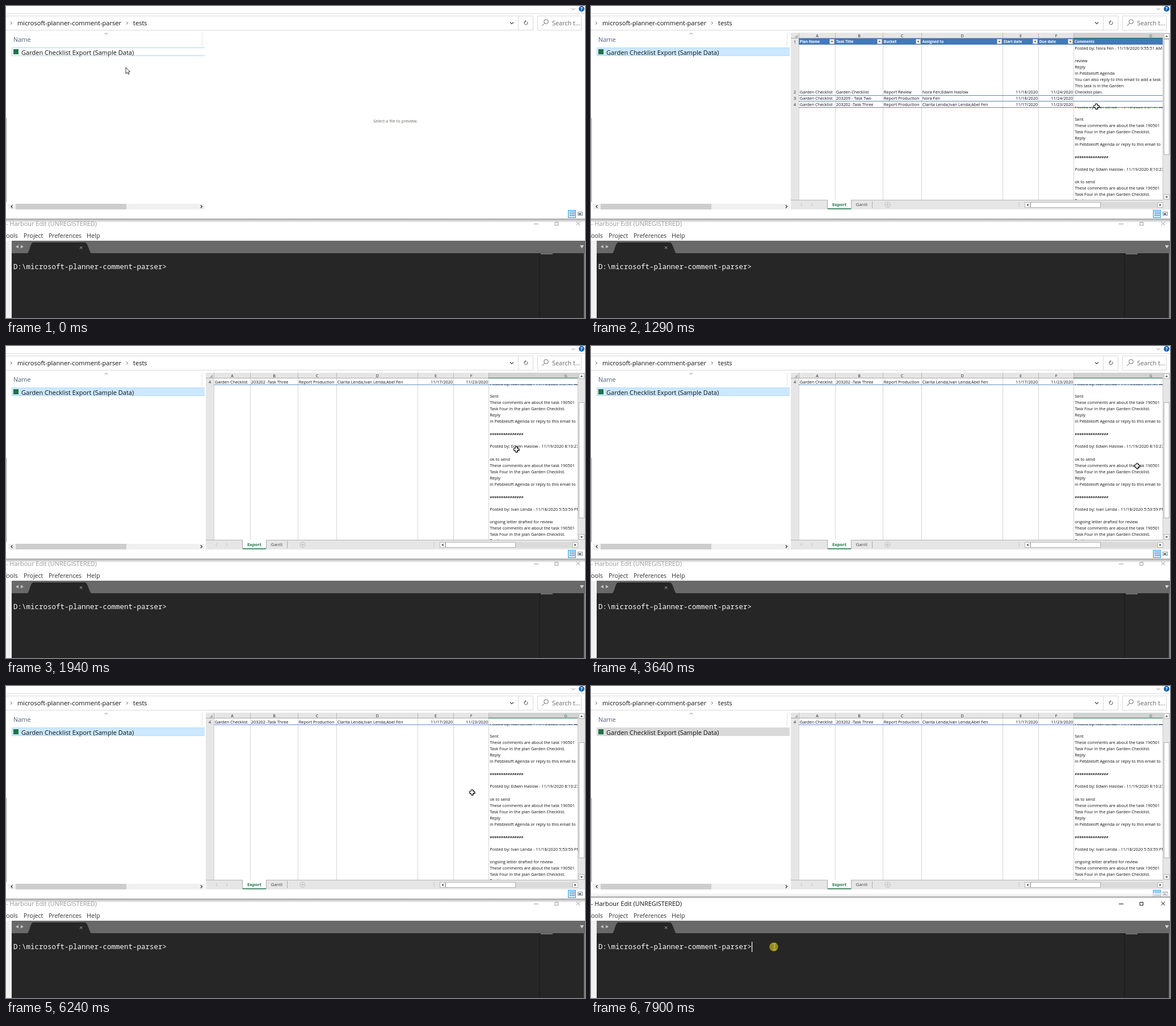
An HTML page that plays this animation: 1020x549 px, repeating every 8 s.

```html
<!DOCTYPE html>
<html lang="en">
<head>
<meta charset="utf-8">
<title>Spreadsheet preview</title>
<style>
html, body { margin: 0; width: 100%; height: 100%; overflow: hidden; background: #fff; }
svg { display: block; width: 1020px; height: 549px; font-family: "Open Sans", "Noto Sans", sans-serif; }
text { white-space: pre; }
.mono { font-family: "Noto Sans Mono", "DejaVu Sans Mono", monospace; }
</style>
</head>
<body>
<svg id="stage" viewBox="0 0 1020 549"></svg>
<script>
const NS = 'http://www.w3.org/2000/svg';
const LOOP = 8000;
const CELL = 7.35, PITCH = 11.03;
const GREEN = '#217346';
const stage = document.getElementById('stage');

function add(parent, tag, attrs = {}, content) {
  const el = document.createElementNS(NS, tag);
  for (const key in attrs) el.setAttribute(key, attrs[key]);
  if (content !== undefined) el.textContent = content;
  parent.appendChild(el);
  return el;
}
const group = (parent, attrs) => add(parent, 'g', attrs);
const rect = (p, x, y, width, height, fill, more = {}) =>
  add(p, 'rect', { x, y, width, height, fill, ...more });
const frame = (p, x, y, w, h, stroke, fill = 'none') =>
  rect(p, x + .5, y + .5, w - 1, h - 1, fill, { stroke });
const shape = (p, d, fill, more = {}) => add(p, 'path', { d, fill, ...more });
const line = (p, d, stroke, width = 1) => shape(p, d, 'none', { stroke, 'stroke-width': width });
const text = (p, x, y, str, size, fill = '#111', more = {}) =>
  add(p, 'text', { x, y, 'font-size': size, fill, ...more }, str);
const show = (el, on) => el.setAttribute('visibility', on ? 'visible' : 'hidden');

const defs = add(stage, 'defs');
function clip(id, x, y, w, h) {
  rect(add(defs, 'clipPath', { id }), x, y, w, h);
}
function fade(id, from, to) {
  const g = add(defs, 'linearGradient', { id, x1: 0, y1: 0, x2: 0, y2: 1 });
  add(g, 'stop', { offset: 0, 'stop-color': from });
  add(g, 'stop', { offset: 1, 'stop-color': to });
}
clip('gridArea', 352, 57, 655, 284);
clip('topNote', 851, 68, 156, 110);
clip('lowNote', 851, 177.5, 156, 400);
fade('shadeDown', '#a3a3a3', '#fdfdfd');
fade('shadeUp', '#ffffff', '#d4d4d4');

// File browser
rect(stage, 0, 0, 1020, 549, '#fff');
line(stage, 'M0 13.5H1020', '#dcdcdc');
line(stage, 'M996.5 4l3 3 3-3', '#888');
add(stage, 'circle', { cx: 1014, cy: 5, r: 5, fill: '#0a63b5' });
text(stage, 1014, 8.3, '?', 9, '#fff', { 'text-anchor': 'middle', 'font-weight': 700 });
line(stage, 'M0 17.5H928.5V42.5H0M902.5 17V42', '#d9d9d9');
frame(stage, 936, 17, 78, 26, '#d9d9d9');
line(stage, 'M8 27.5l2.5 2.5-2.5 2.5M212 27.5l2.5 2.5-2.5 2.5', '#555');
text(stage, 20, 34, 'microsoft-planner-comment-parser', 11.1);
text(stage, 224, 34, 'tests', 11.1);
line(stage, 'M888 28.5l3 3 3-3', '#444', 1.2);
line(stage, 'M918 27.6a3 3 0 1 1-3.4-.5M915.5 25.2v2.6h-2.6', '#444');
add(stage, 'circle', { cx: 951.5, cy: 27.5, r: 3.8, fill: 'none', stroke: '#666' });
line(stage, 'M948.6 30.4L944.5 35', '#666');
text(stage, 962, 34, 'Search t...', 10.9, '#666');
line(stage, 'M174 50l2.5-2.5 2.5 2.5', '#777');
line(stage, 'M345.5 47V70', '#e2e2e2');
text(stage, 13, 63, 'Name', 10.9, '#4c607a');
rect(stage, 0, 197, 1.5, 148, '#bcbcbc');

const hoverRow = group(stage);
line(hoverRow, 'M350 73.5H10.5V87.5H350', '#a5d3f2');
const pickedRow = group(stage);
rect(pickedRow, 10, 73, 340, 15, '#cce8ff');
line(pickedRow, 'M350 73.5H10.5V87.5H350', '#b3dcfb');
const dimRow = rect(stage, 10, 73, 340, 15, '#d9d9d9');
rect(stage, 13, 76, 9, 9, GREEN);
text(stage, 27, 86, 'Garden Checklist Export (Sample Data)', 11.05);

rect(stage, 4, 348, 346, 10, '#f0f0f0');
rect(stage, 17, 348, 195, 10, '#cdcdcd');
line(stage, 'M11.5 350.5l-2.5 2.5 2.5 2.5M343 350.5l2.5 2.5-2.5 2.5', '#333', 1.3);
frame(stage, 990, 359, 14, 14, '#26a0da', '#cce8ff');
for (let y = 363; y < 372; y += 3) line(stage, `M993 ${y - .5}h2M996 ${y - .5}h2.5M999.5 ${y - .5}h2.5`, '#456');
frame(stage, 1007, 362, 9, 7, '#999', '#dfe8ef');
rect(stage, 1009, 365, 4, 2, '#345');

const hint = text(stage, 647, 205.2, 'Select a file to preview.', 7.4, '#6a655e');

// Spreadsheet preview
const sheet = group(stage);
const edges = [366, 430, 514, 582, 725, 788, 850];
const mid = { 'text-anchor': 'middle' };
const end = { 'text-anchor': 'end' };
rect(sheet, 352, 47, 668, 311, '#fff');
rect(sheet, 352, 47, 655, 10, '#e6e6e6');
rect(sheet, 850, 47, 157, 10, '#d2d2d2');
rect(sheet, 352, 57, 14, 284, '#e6e6e6');
shape(sheet, 'M364 50v5.5h-5.5z', '#b0b0b0');
[398.5, 472.5, 548, 654, 757, 819.5].forEach((x, i) => text(sheet, x, 54.8, 'ABCDEF'[i], 7.2, '#222', mid));
text(sheet, 986, 54.8, 'G', 7.2, GREEN, mid);
edges.forEach(x => {
  line(sheet, `M${x + .5} 47V57`, '#b8b8b8');
  line(sheet, `M${x + .5} 57V341`, '#d4d4d4');
});
line(sheet, 'M352 56.5H850', '#ababab');
line(sheet, 'M850 56.5H1007', GREEN);

function dataRow(parent, y, number, cells) {
  text(parent, 359, y + 2.6, number, 7.2, '#222', mid);
  cells.forEach((cell, i) => {
    const isDate = i > 3;
    text(parent, isDate ? edges[i + 1] - .8 : edges[i] + 1.8, y + 2.6, cell, CELL, '#111', isDate ? end : {});
  });
}
function notes(parent, y, lines) {
  lines.forEach((str, i) => {
    if (!str) return;
    const rule = str[0] === '#';
    text(parent, 852.3, y + i * PITCH + 2.6, str, rule ? 6.1 : CELL, '#111', rule ? { 'font-weight': 600 } : {});
  });
}
const plan = 'Garden Checklist', app = 'Pebblesift Agenda';
const rowFour = [plan, '203202 -Task Three', 'Report Production', 'Clarita Lenda;Ivan Lenda;Abel Fen', '11/17/2020', '11/23/2020'];
const post = (who, when, message) => [
  `Posted by: ${who} - ${when}`, '', message,
  'These comments are about the task 190501', `Task Four in the plan ${plan}.`,
  'Reply', `in ${app} or reply to this email to`, '', '###############', ''
];
const lowNotes = [
  ...post('Ivan Lenda', '11/19/2020 9:07:47 AM', 'Sent'),
  ...post('Edwin Haslow', '11/19/2020 8:10:27 AM', 'ok to send'),
  ...post('Ivan Lenda', '11/18/2020 5:53:59 PM', 'ongoing letter drafted for review')
];

const grid = group(sheet, { 'clip-path': 'url(#gridArea)' });
const topView = group(grid);
rect(topView, 366, 57, 641, 11, '#4278bf');
text(topView, 359, 65.6, '1', 7.2, '#222', mid);
['Plan Name', 'Task Title', 'Bucket', 'Assigned to', 'Start date', 'Due date', 'Comments'].forEach((label, i) => {
  text(topView, edges[i] + 1.8, 65.3, label, 6.5, '#fff', { 'font-weight': 700 });
  if (i === 6) return;
  const x = edges[i + 1] - 10;
  frame(topView, x, 58, 9, 9, '#b5b5b5', '#f7f7f7');
  shape(topView, `M${x + 2.5} 61.5h4l-2 2.5z`, '#444');
});
dataRow(topView, 151.7, '2', [plan, plan, 'Report Review', 'Nora Fen;Edwin Haslow', '11/18/2020', '11/24/2020']);
dataRow(topView, 162.5, '3', [plan, '203209 - Task Two', 'Report Production', 'Nora Fen', '11/18/2020', '11/24/2020']);
notes(group(topView, { 'clip-path': 'url(#topNote)' }), 74.3, [
  'Posted by: Nora Fen - 11/19/2020 9:55:51 AM', '', 'review', 'Reply', `in ${app}`,
  'You can also reply to this email to add a task', 'This task is in the Garden', 'Checklist plan.'
]);
line(topView, 'M366 157.5H1007M366 167.5H1007', '#5b87c4');

// Rows from the fourth on move up together when the sheet scrolls
const lowView = group(grid);
dataRow(lowView, 173.4, '4', rowFour);
line(lowView, 'M366 178.5H1007', '#5b87c4');
notes(group(lowView, { 'clip-path': 'url(#lowNote)' }), 177, lowNotes);

rect(sheet, 1007, 47, 13, 294, '#e6e6e6');
line(sheet, 'M1007.5 47V341', '#c6c6c6');
frame(sheet, 1009, 48, 10, 10, '#b5b5b5', '#fff');
shape(sheet, 'M1011.5 54.5h5l-2.5-3z', '#555');
frame(sheet, 1009, 331, 10, 10, '#b5b5b5', '#fff');
shape(sheet, 'M1011.5 335h5l-2.5 3z', '#555');
const thumb = frame(sheet, 1009, 58, 10, 204, '#b0b0b0', '#fff');

rect(sheet, 352, 341, 668, 17, '#e6e6e6');
line(sheet, 'M352 341.5H1007', '#b4b4b4');
line(sheet, 'M372 347l-2.5 2.5 2.5 2.5M388 347l2.5 2.5-2.5 2.5', '#bbb');
rect(sheet, 417, 341, 41, 16, '#fff');
line(sheet, 'M416.5 341V357M458.5 341V357M495.5 343V356', '#ababab');
rect(sheet, 417, 356, 41, 1.5, GREEN);
text(sheet, 437.5, 352.2, 'Export', 7.7, GREEN, { ...mid, 'font-weight': 700 });
text(sheet, 477, 352.2, 'Gantt', 7.8, '#444', mid);
add(sheet, 'circle', { cx: 522.5, cy: 349.5, r: 4.6, fill: 'none', stroke: '#bbb' });
line(sheet, 'M520 349.5h5M522.5 347v5', '#bbb');
for (let y = 346; y < 354; y += 3) rect(sheet, 753.5, y, 1, 1, '#888');
rect(sheet, 765, 345, 242, 10, '#dadada');
frame(sheet, 764, 345, 10, 10, '#b5b5b5', '#fff');
frame(sheet, 774, 345, 124, 10, '#b0b0b0', '#fff');
frame(sheet, 998, 345, 10, 10, '#b5b5b5', '#fff');
shape(sheet, 'M770.5 347.5v5l-3-2.5zM1001.5 347.5v5l3-2.5z', '#444');

// Editor window
rect(stage, 0, 374, 1020, 175, '#fff');
const idleEdge = rect(stage, 0, 374, 1020, 7, 'url(#shadeDown)');
const activeEdge = group(stage);
rect(activeEdge, 0, 364, 1020, 7, 'url(#shadeUp)', { opacity: .6 });
rect(activeEdge, 0, 371, 1020, 10, '#fff');
line(activeEdge, 'M0 371.5H1020', '#666');
const title = group(stage);
text(title, 0, 387, '- Harbour Edit (UNREGISTERED)', 10.95, 'currentColor');
line(title, 'M930 383.5h8M967 380.5h5.5v5.5h-5.5zM1004.5 379.5l6.5 6.5M1011 379.5l-6.5 6.5', 'currentColor');
text(stage, 21, 408, 'Tools', 10.8, '#333', end);
text(stage, 31, 408, 'Project', 10.6, '#333');
text(stage, 75, 408, 'Preferences', 10.5, '#333');
text(stage, 142, 408, 'Help', 10.9, '#333');
rect(stage, 0, 413, 10, 136, '#f2f2f2');
rect(stage, 10, 413, 1010, 22, '#696969');
rect(stage, 10, 435, 1008, 114, '#262626');
rect(stage, 939, 435, 2, 114, '#1f1f1f');
rect(stage, 942, 435.5, 21, 1.3, '#999');
rect(stage, 1018, 435, 2, 114, '#777');
shape(stage, 'M38 435C42 431 43 416 48 416H139C144 416 146 431 150 435z', '#262626');
line(stage, 'M130 423l4.5 4.5M134.5 423l-4.5 4.5', '#aaa');
shape(stage, 'M22 420.5v6l-5-3zM26 420.5v6l5-3z', '#c2c2c2');
shape(stage, 'M1011 421h7l-3.5 5.5z', '#d5d5d5');
text(stage, 13, 463, 'D:\\microsoft-planner-comment-parser>', 12.5, '#fafafa', { class: 'mono' });
const caret = rect(stage, 283, 450, 1.2, 18, '#fff');

// Pointers
const pointer = group(stage);
const arrow = shape(pointer, 'M0 0V11L2.6 8.7 4.4 12.4 6 11.6 4.3 8 7.6 7.8z', '#fff', { stroke: '#222', 'stroke-width': .9 });
const cross = group(pointer);
const plus = 'M-1.7-4.7h3.4v3h3v3.4h-3v3h-3.4v-3h-3v-3.4h3z';
shape(cross, plus, '#000', { transform: 'translate(.8 .8)' });
shape(cross, plus, '#fff', { stroke: '#000' });
const beam = group(pointer);
const halo = add(beam, 'circle', { cx: 0, cy: 0, r: 7.7, fill: '#958c12' });
line(beam, 'M-1.5-5.5h2M2-5.5h2M1.2-5v10M-1.5 5.5h2M2 5.5h2', '#d8d8c4', .9);

// Pointer path: time, x, y
const path = [
  [0, 211, 108], [100, 211, 108], [240, 208, 84], [360, 212, 84], [640, 560, 130], [890, 880, 172],
  [1290, 891, 177], [1740, 894, 179], [1940, 899, 182], [2340, 905, 195], [2640, 948, 226],
  [2840, 956, 270], [3040, 888, 313], [3240, 813, 270], [3440, 890, 222], [3540, 938, 220], [3640, 962, 211],
  [3840, 945, 145], [4040, 880, 107], [4240, 816, 150], [4440, 808, 238], [4640, 789, 231],
  [4840, 830, 160], [4960, 890, 144], [5140, 966, 205], [5300, 925, 285], [5440, 868, 258],
  [5640, 829, 185], [5840, 895, 119], [6000, 966, 180], [6100, 910, 252], [6240, 821, 187],
  [6340, 840, 110], [6440, 850, 73], [6640, 730, 125], [6900, 470, 280], [7100, 332, 344],
  [7300, 323, 430], [7500, 322, 459], [8000, 322, 459]
];

function pointerAt(t) {
  let i = 0;
  while (i < path.length - 2 && path[i + 1][0] <= t) i++;
  const a = path[i], b = path[i + 1], span = b[0] - a[0], u = (t - a[0]) / span;
  const slope = (k, axis) => {
    if (k === 0 || k === path.length - 1) return 0;
    const p = path[k - 1], n = path[k + 1], m = path[k];
    const s = (m[axis] - p[axis]) / (m[0] - p[0]), e = (n[axis] - m[axis]) / (n[0] - m[0]);
    return s * e > 0 ? 2 * s * e / (s + e) : 0;
  };
  const at = axis => {
    const u2 = u * u, u3 = u2 * u;
    return (2 * u3 - 3 * u2 + 1) * a[axis] + (u3 - 2 * u2 + u) * span * slope(i, axis)
      + (3 * u2 - 2 * u3) * b[axis] + (u3 - u2) * span * slope(i + 1, axis);
  };
  return [at(1), at(2)];
}

function render(now) {
  const raw = now % LOOP;
  const phase = raw >= 7100 || raw < 40 ? 0 : 40;
  const t = Math.floor((raw - phase) / 100) * 100 + phase;
  const active = t >= 7800, picked = t >= 300, loaded = t >= 640;
  const scrolled = t >= 1540 && !(t >= 2140 && t < 2440);

  show(hoverRow, !picked);
  show(pickedRow, picked && !active);
  show(dimRow, active);
  show(hint, !loaded);
  sheet.style.display = loaded ? '' : 'none';
  topView.style.display = scrolled ? 'none' : '';
  lowView.setAttribute('transform', `translate(0 ${scrolled ? -110.4 : 0})`);
  thumb.setAttribute('y', scrolled ? 99.5 : 58.5);

  show(idleEdge, !active);
  show(activeEdge, active);
  title.setAttribute('color', active ? '#111' : '#999');
  show(caret, active);
  show(halo, active);

  const [x, y] = pointerAt(t);
  pointer.setAttribute('transform', `translate(${x.toFixed(1)} ${y.toFixed(1)})`);
  const overGrid = loaded && x > 366 && x < 1007 && y > 57 && y < 341;
  const overCode = y > 435;
  cross.style.display = overGrid ? '' : 'none';
  beam.style.display = overCode ? '' : 'none';
  arrow.style.display = overGrid || overCode ? 'none' : '';
}

const start = performance.now();
function tick() {
  render(performance.now() - start);
  requestAnimationFrame(tick);
}
tick();
</script>
</body>
</html>
```
